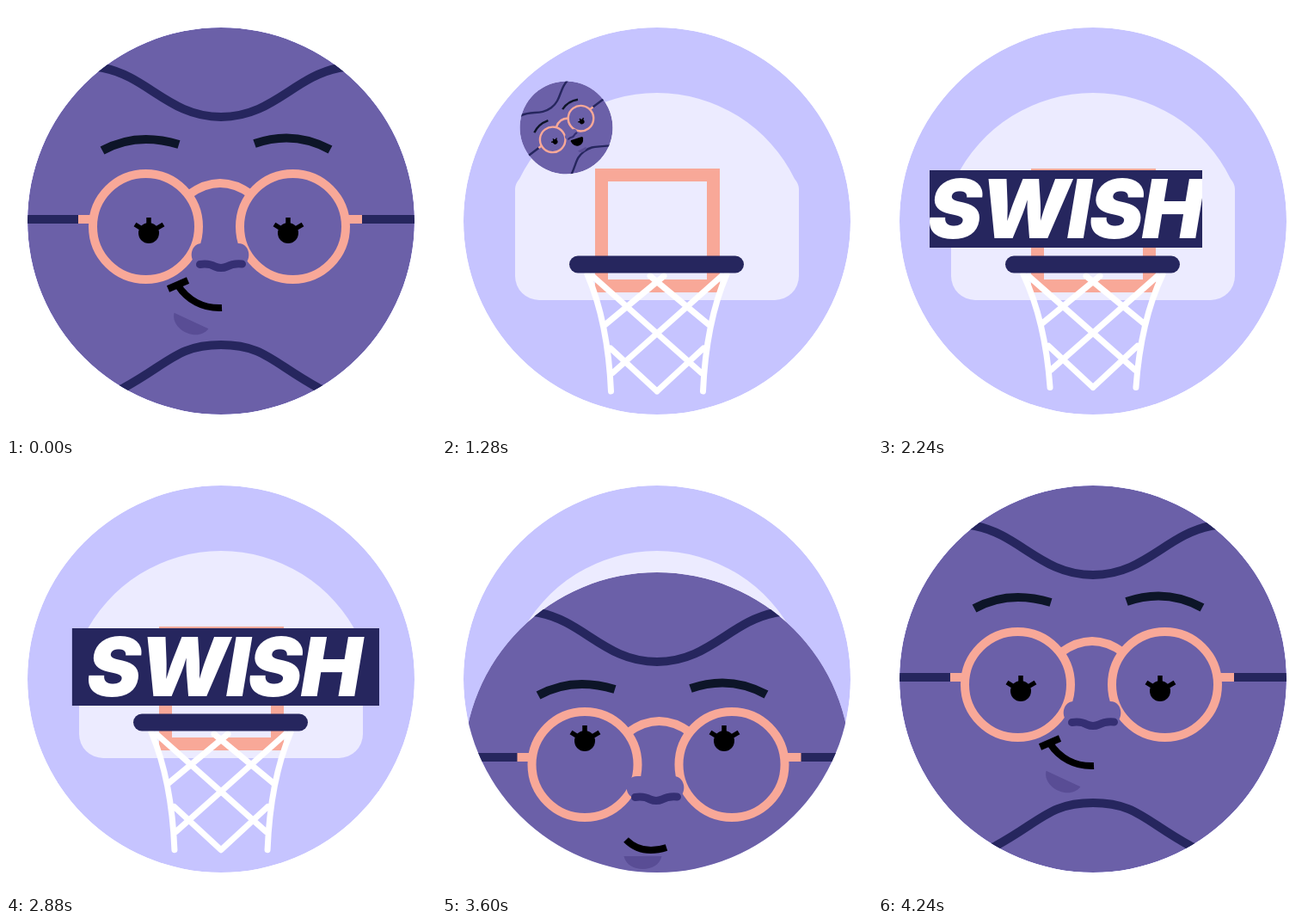
Write an HTML page that moves like this. It is 500 px wide and 500 px high and loops after 4.32 s.

```html
<!DOCTYPE html>
<html lang="en">
<head>
<meta charset="utf-8">
<title>Swish</title>
<style>
  html, body { margin: 0; width: 100%; height: 100%; overflow: hidden; background: #fff; }
  svg { display: block; width: 100vw; height: 100vh; }
  .line { fill: none; stroke: #26265e; stroke-width: 10; }
  .pink { fill: none; stroke: #f8a898; stroke-width: 10; }
  .net { fill: none; stroke: #fff; stroke-width: 7; stroke-linecap: round; }
  .word { font: italic 900 95px Inter, "Liberation Sans", sans-serif; letter-spacing: -2px; fill: #fff; text-anchor: middle; }
</style>
</head>
<body>
<svg viewBox="0 0 500 500">
  <defs>
    <clipPath id="disc"><circle cx="250" cy="250" r="225"/></clipPath>
    <clipPath id="bannerClip"><rect id="bannerWindow" y="191" height="90"/></clipPath>
    <g id="eyeShape">
      <circle r="12"/>
      <path d="M0 0V-18M0 0L-16 -10M0 0L17 -10" stroke="#000" stroke-width="5.5"/>
    </g>
  </defs>
  <g id="scene" clip-path="url(#disc)">
    <circle cx="250" cy="250" r="225" fill="#c6c4ff"/>
    <path fill="#ecebff" d="M85 213Q85 207 90 201A178 178 0 0 1 410 201Q415 207 415 213V314a28 28 0 0 1-28 28H113a28 28 0 0 1-28-28Z"/>
    <rect class="pink" x="185.5" y="196.5" width="130" height="129" style="stroke-width:15"/>
    <g id="hoop">
      <path id="net" class="net"/>
      <path d="M158 300.5H341" stroke="#26265e" stroke-width="20" stroke-linecap="round"/>
    </g>
    <g id="banner" clip-path="url(#bannerClip)">
      <rect y="191" width="500" height="90" fill="#26265e"/>
      <text id="word" class="word" y="270">SWISH</text>
    </g>
    <g id="ball">
      <g clip-path="url(#disc)">
        <circle cx="250" cy="250" r="225" fill="#6b60a8"/>
        <path class="line" d="M95 69L113 72C165 82 190 129 250 129S335 82 387 72L405 69"/>
        <path class="line" d="M115 454L137 444C190 415 200 394 250 394S310 415 363 444L385 454"/>
        <path id="chin" d="M-22 0H22C18 20-18 20-22 0Z" fill="#594d95"/>
        <path id="brows" fill="none" stroke="#0d1528" stroke-width="10"/>
        <g id="glasses">
          <path class="line" d="M0 248H85M413 248H500"/>
          <path class="pink" d="M84 248H100M397 248H414M213 219Q249 193 285 219"/>
          <circle class="pink" cx="162.5" cy="256.5" r="61.5"/>
          <circle class="pink" cx="333.5" cy="256.5" r="61.5"/>
        </g>
        <g id="eyes">
          <use href="#eyeShape" x="166" y="264"/>
          <use href="#eyeShape" x="328" y="264"/>
        </g>
        <g id="nose">
          <path fill="#6b60a8" d="M228 276C212 276 212 301 226 301L250 306 273 301C286 301 286 276 270 276Z"/>
          <path d="M225.500 300.500Q236 299 243 303Q250 306 257 303Q264 299 274.500 300" fill="none" stroke="#352f73" stroke-width="9" stroke-linecap="round"/>
        </g>
        <path id="mouth" stroke="#000" stroke-width="8" stroke-linejoin="bevel"/>
        <path id="tick" stroke="#000" stroke-width="8"/>
      </g>
    </g>
  </g>
</svg>
<script>
const LOOP = 4320, STEP = 80;
const el = Object.fromEntries([...document.querySelectorAll("[id]")].map(n => [n.id, n]));
const set = (node, name, value) => node.setAttribute(name, value);
const mix = (a, b, k) => a + (b - a) * k;
const progress = (t, from, to) => Math.min(1, Math.max(0, (t - from) / (to - from)));
const smooth = k => k * k * (3 - 2 * k);

function track(t, keys) {
  const next = keys.findIndex(key => key[0] > t);
  if (next === 0) return keys[0][1];
  if (next < 0) return keys[keys.length - 1][1];
  const [a, b] = [keys[next - 1], keys[next]];
  return mix(a[1], b[1], progress(t, a[0], b[0]));
}

// Mouth: two cubic curves, lower lip then upper lip back to the start.
const smirk = {
  glasses: [0, 0], eyes: [0, 0], nose: [0, 0], tick: [1], chin: [215.5, 366, 25],
  brows: [112, 168, 152, 146, 201, 161, 289, 160, 335, 144, 377, 167],
  mouth: [200, 325, 211, 342, 229, 352, 251, 351, 229, 352, 211, 342]
};
const worried = {
  ...smirk, eyes: [0, 10], tick: [0], chin: [249, 367, 0],
  brows: [113, 166, 165, 169, 198, 142, 291, 142, 323, 163, 376, 163],
  mouth: [237, 335, 237, 348, 257, 348, 257, 335, 257, 322, 237, 322]
};
const joyful = {
  ...smirk, eyes: [0, 8], tick: [0], chin: [249, 378, 10],
  brows: smirk.brows.map((v, i) => v + (i % 2 ? 8 : 0)),
  mouth: [231, 316, 226, 352, 262, 370, 283, 335, 266, 329, 248, 322]
};
const rising = {
  ...smirk, glasses: [3.5, -8], eyes: [0, -43], nose: [-1, -14], tick: [0], chin: [233.5, 355, 0],
  mouth: [214, 336, 226, 348, 242, 351, 261, 345, 242, 351, 226, 348]
};

function blend(a, b, k) {
  const pose = {};
  for (const part in a) pose[part] = a[part].map((v, i) => mix(v, b[part][i], k));
  return pose;
}

function poseAt(t) {
  if (t < 720) return blend(smirk, worried, smooth(progress(t, 240, 720)));
  if (t < 2080) return blend(worried, joyful, smooth(progress(t, 720, 1200)));
  return blend(rising, smirk, smooth(progress(t, 3600, 4080)));
}

function drawFace({ glasses, eyes, nose, tick, chin, brows: b, mouth: m }) {
  set(el.glasses, "transform", `translate(${glasses})`);
  set(el.eyes, "transform", `translate(${eyes})`);
  set(el.nose, "transform", `translate(${nose})`);
  set(el.chin, "transform", `translate(${chin[0]} ${chin[1]}) rotate(${chin[2]})`);
  set(el.brows, "d", `M${b.slice(0, 2)}Q${b.slice(2, 6)}M${b.slice(6, 8)}Q${b.slice(8)}`);
  set(el.mouth, "d", `M${m.slice(0, 2)}C${m.slice(2, 8)}C${m.slice(8)},${m.slice(0, 2)}Z`);
  const dx = 11.5 * tick[0], dy = 5 * tick[0];
  set(el.tick, "d", tick[0] ? `M${m[0] - dx} ${m[1] - 1 + dy}l${2 * dx} ${-2 * dy}` : "");
}

function ballAt(t) {
  if (t < 720) return { x: 250, y: 250 - 34 * smooth(progress(t, 240, 720)), size: 1, turn: 0 };
  if (t < 1280) {
    const k = smooth(progress(t, 720, 1280));
    return { x: mix(250, 144.5, k), y: mix(216, 141.5, k), size: mix(1, 0.24, k), turn: -37 * k };
  }
  if (t < 2080) {
    const s = (t - 1280) / 1000, k = progress(s, 0, 0.44);
    return { x: mix(144.5, 250, k * (1.6 - 0.6 * k)), y: 141.5 + 800 * s * s, size: 0.24, turn: -37 * (1 - k) };
  }
  const settle = t < 4160 ? 101 * Math.exp((3600 - t) / 147) : 0;
  return { x: 250, y: 250 + settle, size: 1, turn: 0 };
}

function drawBall(t) {
  const { x, y, size, turn } = ballAt(t);
  set(el.ball, "transform", `translate(${x} ${y}) rotate(${turn}) scale(${size}) translate(-250 -250)`);
  el.scene.insertBefore(el.ball, t >= 1280 && t < 2080 ? el.hoop : null);
}

function drawNet(t) {
  const s = t - 1840;
  const stretch = s > 0 && t < 3040 ? 0.12 * Math.exp(-s / 350) * Math.sin(2 * Math.PI * s / 480) : 0;
  const point = (x, y) => {
    const depth = (y - 314) / 134;
    return `${250 + (x - 250) * (1 + 2 * stretch * depth)} ${314 + (y - 314) * (1 + stretch)}`;
  };
  let d = "";
  for (const side of [-1, 1]) {
    const at = (dx, y) => point(250 + side * dx, y);
    d += `M${at(81, 312)}Q${at(57, 368)} ${at(53.5, 448)}`
       + `M${at(75, 314)}L${at(-52, 427)}`
       + `M${at(8, 314)}L${at(-62, 372)}`
       + `M${at(54, 398)}L${at(0, 448)}`;
  }
  set(el.net, "d", d);
}

function drawBanner(t) {
  const left = track(t, [[1920, 31], [2240, 60], [2400, 64], [2960, 79], [3120, 92], [3440, 460]]);
  const right = track(t, [[1880, 31], [2240, 377], [2400, 418], [2880, 434], [2960, 436], [3200, 452], [3440, 460]]);
  const shift = track(t, [[1920, -110], [2240, -36], [2400, -15], [2880, 0], [3440, 30]]);
  set(el.bannerWindow, "x", left);
  set(el.bannerWindow, "width", Math.max(0, right - left));
  set(el.word, "x", 253 + shift);
  set(el.banner, "visibility", right > left ? "visible" : "hidden");
}

function draw(t) {
  drawFace(poseAt(t));
  drawBall(t);
  drawNet(t);
  drawBanner(t);
}

const start = performance.now();
function tick() {
  const t = (performance.now() - start) % LOOP;
  draw(Math.floor(t / STEP) * STEP);
  requestAnimationFrame(tick);
}
tick();
</script>
</body>
</html>
```
